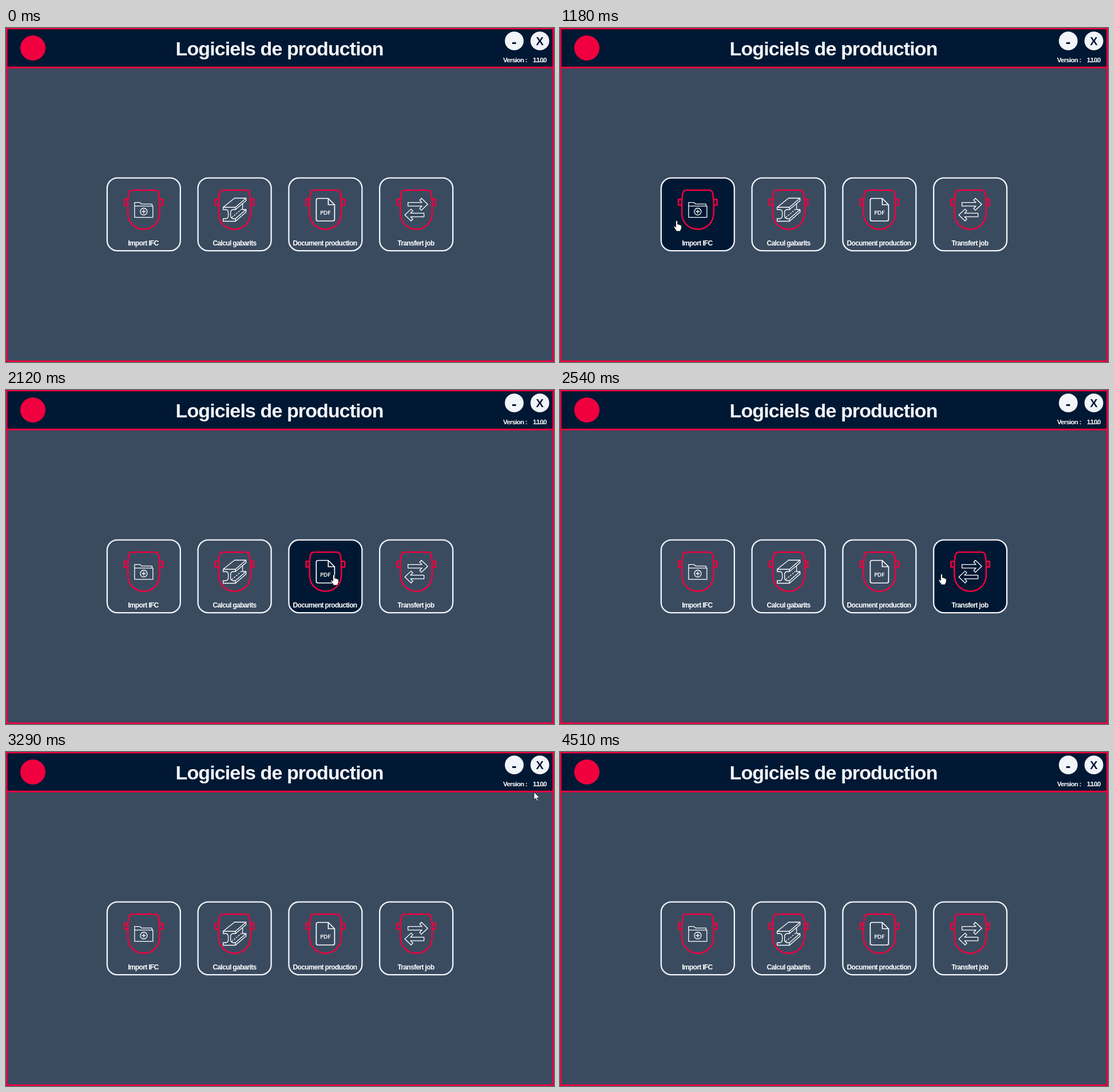
Recreate the animation shown at these times as an HTML page. Size 958 px wide and 585 px high, loop 6.11 s.

```html
<!DOCTYPE html>
<html lang="fr">
<head>
<meta charset="utf-8">
<title>Logiciels de production</title>
<style>
  html, body { margin: 0; width: 100%; height: 100%; overflow: hidden; background: #3a4b60; }
  svg { display: block; width: 958px; height: 585px; }
  text { font-family: "Liberation Sans", Arial, sans-serif; font-weight: 700; fill: #fff; white-space: pre; }
  .title { font-size: 34px; letter-spacing: -.89px; fill: #f4f6fb; }
  .label { font-size: 12px; letter-spacing: -.67px; }
  .version { font-size: 11.5px; letter-spacing: -.75px; }
  .number { letter-spacing: -1.75px; }
  .sign { fill: #001833; text-anchor: middle; }
  .pdf { font: 700 9.5px Lato, sans-serif; text-anchor: middle; }
  .box { fill: #3a4b60; stroke: #f4f6fb; stroke-width: 2.3; }
  .tile.hot .box { fill: #001833; }
  .button circle { fill: #f1f4f9; }
  .button.hot circle { fill: #a9b3bf; }
  .mask { fill: none; stroke: #f0003f; stroke-width: 2.6; }
  .icon { fill: none; stroke: #fff; stroke-width: 1.3; stroke-linejoin: round; }
  .cursor { fill: #fff; stroke: #000; stroke-width: .8; stroke-linejoin: round; }
</style>
</head>
<body>
<svg viewBox="0 0 958 585">
  <defs>
    <g id="frame">
      <path class="mask" d="M-19 284H19Q26 284 26.5 291L27.8 302V324C27.8 341 15 352.5 0 352.5S-27.8 341 -27.8 324V302L-26.5 291Q-26 284 -19 284Z
        M-27.8 300.3H-33.7V310H-27.8M27.8 300.3H33.7V310H27.8"/>
    </g>
  </defs>

  <rect width="958" height="585" fill="#3a4b60"/>
  <rect width="958" height="70" fill="#001833"/>
  <path d="M0 69.3H958" stroke="#f0003f" stroke-width="3"/>
  <rect x="1.2" y="1" width="955.4" height="582.6" fill="none" stroke="#f0003f" stroke-width="2.6"/>

  <circle cx="47" cy="35" r="22" fill="#f0003f"/>
  <text class="title" x="296.6" y="48">Logiciels de production</text>
  <text class="version" x="869" y="60">Version :</text>
  <text class="version number" x="921" y="60">1.1.0.0</text>

  <g class="button">
    <circle cx="888.5" cy="22.7" r="16.4"/>
    <text class="sign" x="888.3" y="33" font-size="26">-</text>
  </g>
  <g class="button">
    <circle cx="933.3" cy="22.7" r="16.4"/>
    <text class="sign" x="933.2" y="30" font-size="20">X</text>
  </g>

  <g class="tile" transform="translate(240.8)">
    <rect class="box" x="-64" y="262.6" width="128" height="127.6" rx="18"/>
    <use href="#frame"/>
    <g class="icon">
      <path d="M-16 312V305.6H-6.5L-4 308.3H14.5V311.8M-16 311.8H16V331.6H-16ZM0 318V325M-3.5 321.5H3.5"/>
      <circle cy="321.5" r="6"/>
    </g>
    <text class="label" x="-27.6" y="381">Import IFC</text>
  </g>
  <g class="tile" transform="translate(399.6)">
    <rect class="box" x="-64" y="262.6" width="128" height="127.6" rx="18"/>
    <use href="#frame"/>
    <g class="icon">
      <path d="M-20 314L0 298H20L1.5 314ZM-20 314H1.5V318H-3Q-7 319 -7 323V329Q-7 333 -3 334H1.5V338.5H-20V334H-15Q-11 333 -11 329V323Q-11 319 -15 318H-20Z
        M20 298V302.5L1.5 318M1.5 334L20 318V322.5L1.5 338.5M14 308V318H20"/>
      <path d="M-5 332L14 316" stroke-dasharray="3 2"/>
    </g>
    <text class="label" x="-38" y="381">Calcul gabarits</text>
  </g>
  <g class="tile" transform="translate(558.4)">
    <rect class="box" x="-64" y="262.6" width="128" height="127.6" rx="18"/>
    <use href="#frame"/>
    <path class="icon" style="stroke-width:1.7" d="M5 298.5H-13Q-16 298.5 -16 301.5V335Q-16 338 -13 338H13Q16 338 16 335V309.5ZV309.5H16"/>
    <text class="pdf" y="327.3">PDF</text>
    <text class="label" x="-56.8" y="381">Document production</text>
  </g>
  <g class="tile" transform="translate(717.2)">
    <rect class="box" x="-64" y="262.6" width="128" height="127.6" rx="18"/>
    <use href="#frame"/>
    <path class="icon" d="M-14.5 305.6H10L6 301.5L9 298.3L20 308.7L9 319.2L6 316L10 311.8H-14.5Z
      M13.5 324.4H-10L-6 320.3L-9 317.1L-20 327.5L-9 338L-6 334.8L-10 330.6H13.5Z"/>
    <text class="label" x="-32.6" y="381">Transfert job</text>
  </g>

  <g id="pointer" class="cursor" visibility="hidden">
    <path id="arrow" d="M0 0V14L3.2 11L5.2 16L7.4 15L5.3 10.2H9.8Z"/>
    <path id="hand" d="M-1.5 1.2Q0 -.8 1.5 1.2V7Q3 6 4.2 7.5Q5.5 6.8 6.3 8.2Q8 7.8 8.3 9.8V13.5Q8 16 6.5 17.5V19H-1V17.5Q-3.5 14.5 -5 11.5Q-5 9.5 -3.2 10.2L-1.5 12Z"/>
  </g>
</svg>
<script>
  const LOOP = 6110, GONE = 4510;
  // Each gesture: start, end, steps, then three [step, x, y] points on its curve.
  const gestures = [
    [440, 1050, 10, [0, 779, 562], [5, 396, 459], [9, 228, 381]],
    [1110, 1180, 2, [0, 214, 356], [1, 204, 337], [2, 200, 330]],
    [1440, 1720, 5, [0, 262, 333], [2, 339, 326], [4, 398, 320]],
    [1980, 2260, 5, [0, 452, 322], [2, 573, 323], [4, 604, 323]],
    [2460, 3020, 9, [0, 636, 322], [1, 667, 322], [8, 859, 186]],
    [3090, 3700, 10, [0, 870, 168], [3, 923, 70], [9, 929, 29]],
    [3900, 4040, 3, [0, 902, 28], [1, 875, 27], [2, 846, 27]],
    [4430, 4500, 1, [0, 839, 3], [1, 839, 3], [2, 839, 3]]
  ];
  const $ = id => document.getElementById(id);
  const pointer = $('pointer'), arrow = $('arrow'), hand = $('hand');
  const tiles = [...document.querySelectorAll('.tile')];
  const buttons = [...document.querySelectorAll('.button')];

  // Quadratic through three points, evaluated at step k.
  function curve(k, a, b, c, i) {
    const s = (b[i] - a[i]) / (b[0] - a[0]);
    const r = (c[i] - b[i]) / (c[0] - b[0]);
    return a[i] + s * (k - a[0]) + (r - s) / (c[0] - a[0]) * (k - a[0]) * (k - b[0]);
  }

  function place(t) {
    const g = gestures.filter(g => t >= g[0]).pop();
    if (!g || t >= GONE) return null;
    const [start, end, n, a, b, c] = g;
    const step = (end - start) / Math.max(1, n - 1);
    const k = Math.min(n - 1, Math.floor((t - start) / step + .1));
    return [curve(k, a, b, c, 1), curve(k, a, b, c, 2)];
  }

  const onTile = (p, i) => Math.abs(p[0] - 240.8 - i * 158.8) < 64 && Math.abs(p[1] - 326.4) < 64;
  const onButton = (p, i) => Math.hypot(p[0] - 888.5 - i * 44.8, p[1] - 22.7) < 16.4;

  function draw(now) {
    const p = place(now % LOOP);
    let over = false;
    const mark = hit => (el, i) => {
      const hot = !!p && hit(p, i);
      el.classList.toggle('hot', hot);
      over = over || hot;
    };
    tiles.forEach(mark(onTile));
    buttons.forEach(mark(onButton));
    pointer.setAttribute('visibility', p ? 'visible' : 'hidden');
    if (p) pointer.setAttribute('transform', `translate(${p[0].toFixed(1)} ${p[1].toFixed(1)})`);
    arrow.style.display = over ? 'none' : '';
    hand.style.display = over ? '' : 'none';
  }

  const begin = performance.now();
  function tick() {
    draw(performance.now() - begin);
    requestAnimationFrame(tick);
  }
  tick();
</script>
</body>
</html>
```
